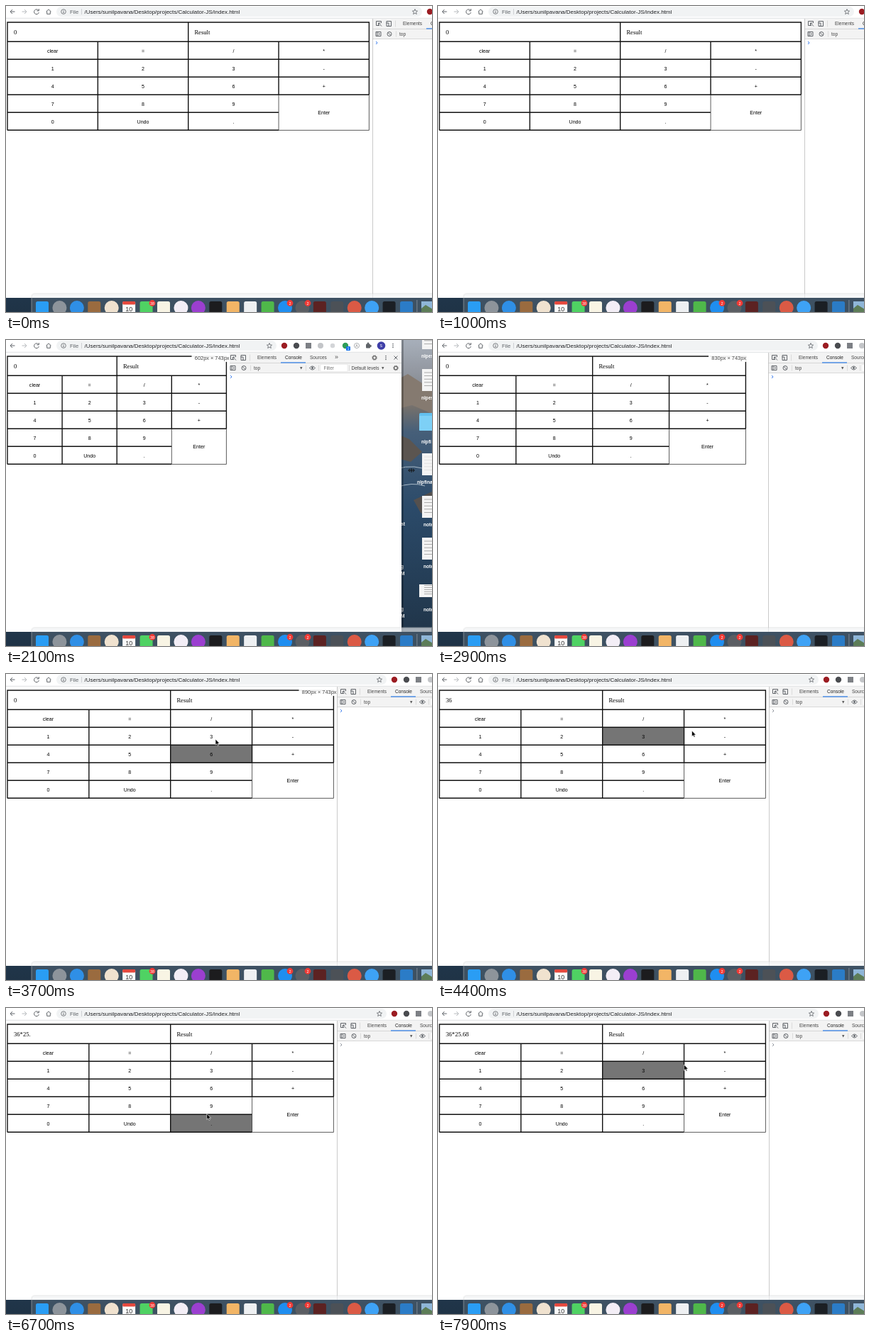
Recreate the animation shown at these times as an HTML page. Size 600 px wide and 432 px high, loop 8000 ms.

```html
<!DOCTYPE html>
<html lang="en">
<head>
<meta charset="utf-8">
<title>Calculator</title>
<style>
  html, body { margin: 0; width: 100%; height: 100%; overflow: hidden; background: #fff; }
  svg { display: block; width: 600px; height: 432px; font-family: "Liberation Sans", Arial, sans-serif; }
  .display { font-family: "Liberation Serif", Times, serif; font-size: 8.6px; }
  .key { font-size: 7.1px; text-anchor: middle; }
  .tab { font-size: 6.5px; fill: #444; }
  .file { font-size: 6.6px; font-weight: bold; fill: #fff; }
  .icon { fill: none; stroke: #5f6368; stroke-width: 1; }
</style>
</head>
<body>
<svg id="stage" viewBox="0 0 600 432">
  <defs>
    <linearGradient id="coast" x2="0" y2="1">
      <stop offset="0" stop-color="#a7afba"/>
      <stop offset=".14" stop-color="#8b8f97"/>
      <stop offset=".22" stop-color="#74706c"/>
      <stop offset=".3" stop-color="#465f79"/>
      <stop offset=".55" stop-color="#2b4a69"/>
      <stop offset="1" stop-color="#1f3346"/>
    </linearGradient>
    <clipPath id="pageClip"><rect id="clipRect" y="18" height="394"/></clipPath>
  </defs>
</svg>
<script>
const LOOP = 8000, STEP = 100;
const PANEL = 246;        // width of the developer panel
const PX = 0.5235;        // stage pixels per page pixel
const stage = document.getElementById('stage');
const clipRect = document.getElementById('clipRect');

function set(node, attrs) {
  for (const k in attrs) node.setAttribute(k, attrs[k]);
  return node;
}
function el(parent, tag, attrs, text) {
  const node = set(document.createElementNS('http://www.w3.org/2000/svg', tag), attrs || {});
  if (text !== undefined) node.textContent = text;
  parent.appendChild(node);
  return node;
}
const rect = (p, x, y, width, height, fill, extra) =>
  el(p, 'rect', { x, y, width, height, fill, ...extra });
const dot = (p, cx, cy, r, fill, extra) => el(p, 'circle', { cx, cy, r, fill, ...extra });
const path = (p, d, extra) => el(p, 'path', { d, class: 'icon', ...extra });
const text = (p, x, y, s, extra) => el(p, 'text', { x, y, ...extra }, s);

function gear(p, x, y) {
  dot(p, x, y, 2.3, 'none', { stroke: '#666', 'stroke-width': 1.3 });
  dot(p, x, y, 3.3, 'none', { stroke: '#666', 'stroke-width': 1, 'stroke-dasharray': '1.3 1.29' });
}
function kebab(p, x, y) {
  [-2.4, 0, 2.4].forEach(d => dot(p, x, y + d, 0.8, '#5f6368'));
}

// Desktop
const desktop = el(stage, 'g');
rect(desktop, 0, 0, 600, 432, 'url(#coast)');
path(desktop, 'M540 62L566 48L600 70V104L572 92L540 100Z', { style: 'fill:#857a70;stroke:none' });
path(desktop, 'M540 128L568 140L586 158L570 172L540 164Z', { style: 'fill:#5b5550;stroke:none' });
path(desktop, 'M574 226L600 214V250L584 244Z', { style: 'fill:#54504e;stroke:none' });
path(desktop, 'M550 182Q575 174 600 186M550 208Q572 200 590 206', { style: 'stroke:#a9bac8' });
[[-18, 'nlpes'], [41, 'nlpes'], [103, 'nlpfi'], [160, 'nlpfinal'], [220, 'note'], [279, 'note'], [340, 'note']]
  .forEach(([y, name], i) => {
    if (i === 2) {
      rect(desktop, 582, y, 24, 25, '#62c0ef', { rx: 2 });
      rect(desktop, 582, y + 4, 24, 21, '#7dd0f6', { rx: 1 });
    } else {
      const tall = i < 6;
      rect(desktop, tall ? 586 : 582, tall ? y : 345, 24, tall ? 31 : 18, '#f4f4f4');
      for (let k = 1; k < 6; k++)
        rect(desktop, 589, (tall ? y : 343) + k * (tall ? 4.6 : 3), 11, 0.8, i === 3 ? '#ddd' : '#9a9a9a');
    }
    text(desktop, i === 3 ? 579 : i > 3 ? 588 : 585, y + 43, name, { class: 'file' });
  });
[[262, 'at'], [322, 'g'], [332, 'M'], [382, 'g'], [392, 'M']]
  .forEach(([y, s]) => text(desktop, 556, y, s, { class: 'file' }));

// Browser window
const shadow = rect(stage, 0, 0, 3, 412, '#000', { opacity: 0.25 });
const frame = rect(stage, 0, 0, 600, 412, '#fff');

// Developer panel, x measured from the window's right edge
const panel = el(stage, 'g');
rect(panel, -PANEL, 18, PANEL, 28.5, '#f3f3f3');
[32, 46].forEach(y => rect(panel, -PANEL, y, PANEL, 0.7, '#cbcbcb'));
rect(panel, -PANEL, 18, 0.8, 394, '#bdbdbd');
path(panel, 'M-236 27.5H-240.5V21.5H-233.5V24M-237.5 24L-233 28.5M-237.5 27V24H-234.5');
path(panel, 'M-226 28.5V21.5H-219.5V28.5ZM-226.5 24H-223V29');
rect(panel, -214, 20.5, 0.6, 9, '#ccc');
[[-203, 'Elements'], [-164, 'Console'], [-129, 'Sources']].forEach(([x, s]) =>
  text(panel, x, 27.2, s, { class: 'tab', style: s === 'Console' ? 'fill:#222' : '' }));
rect(panel, -170, 31.4, 35, 1.1, '#1a73e8');
text(panel, -94, 27.4, '»', { style: 'font-size:9px;fill:#555' });
gear(panel, -38, 25);
kebab(panel, -22, 25);
path(panel, 'M-10.5 22.5L-5.5 27.5M-5.5 22.5L-10.5 27.5');
path(panel, 'M-241 36.5H-234V42.5H-241ZM-239 36.5V42.5M-237.5 38L-235.5 39.5L-237.5 41');
dot(panel, -222, 39.5, 3, 'none', { stroke: '#5f6368' });
path(panel, 'M-224 37.5L-220 41.5');
[-213, -135, -117, -74].forEach(x => rect(panel, x, 35.5, 0.6, 8, '#ccc'));
text(panel, -208, 41.8, 'top', { class: 'tab' });
text(panel, -143, 41.4, '▼', { style: 'font:4.5px "DejaVu Sans",sans-serif;fill:#555' });
path(panel, 'M-129.5 39.5Q-125.5 34.5 -121.5 39.5Q-125.5 44.5 -129.5 39.5Z');
dot(panel, -125.5, 39.5, 1.4, '#5f6368');
rect(panel, -114, 34.5, 38, 10, '#fff', { stroke: '#ddd', 'stroke-width': 0.5 });
text(panel, -109.5, 41.8, 'Filter', { class: 'tab', style: 'fill:#777' });
text(panel, -70.5, 41.8, 'Default levels', { class: 'tab' });
text(panel, -28, 41.4, '▼', { style: 'font:4.5px "DejaVu Sans",sans-serif;fill:#555' });
gear(panel, -8, 39.5);
const prompt = path(panel, 'M-241 50L-239 52L-241 54');

// Page with the calculator
const page = el(stage, 'g', { 'clip-path': 'url(#pageClip)' });
const sheet = rect(page, 0, 18, 600, 394, '#fff');
const ROWS = [
  ['clear', '=', '/', '*'], ['1', '2', '3', '-'], ['4', '5', '6', '+'],
  ['7', '8', '9', 'Enter'], ['0', 'Undo', '.']
];
const keys = [];
ROWS.forEach((row, r) => row.forEach((label, c) => {
  const tall = label === 'Enter', y = 50 + 25 * r, h = tall ? 50 : 25;
  keys.push({ label, c, y, h, box: rect(page, 0, y + 0.5, 1, h, '#fff') });
}));
keys.forEach(k => { k.label = text(page, 0, k.y + k.h / 2 + 3, k.label, { class: 'key' }); });
const grid = path(page, '', { style: 'stroke:#111;stroke-width:1.4' });
const enterEdge = path(page, '', { style: 'stroke:#333;stroke-width:.8' });
const entry = text(page, 11, 39.5, '0', { class: 'display' });
const result = text(page, 0, 39.5, 'Result', { class: 'display' });
const sizeTip = el(page, 'g');
rect(sizeTip, -53.5, 18, 53.5, 13, '#fff', { opacity: 0.92 });
const sizeText = text(sizeTip, -0.5, 27.6, '', { style: 'font-size:7.4px;fill:#444;text-anchor:end' });

// Toolbar
const bar = rect(stage, 0, 0, 600, 17, '#fff');
const barLine = rect(stage, 0, 16.8, 600, 0.8, '#d5d7da');
const pill = rect(stage, 71, 1, 500, 14, '#f1f3f4', { rx: 7 });
path(stage, 'M12.5 8H6M9 5L6 8L9 11');
path(stage, 'M22.5 8H29M26 5L29 8L26 11', { style: 'stroke:#b5b8bc' });
path(stage, 'M45.6 6A3.4 3.4 0 1 0 46.3 9M46.3 4V6.8H43.5');
path(stage, 'M56.5 8L60 4.8L63.5 8M57.7 7.5V11.3H62.3V7.5');
dot(stage, 81, 8, 3.3, 'none', { stroke: '#5f6368', 'stroke-width': 0.8 });
path(stage, 'M81 7.5V10M81 6V6.7');
text(stage, 90, 10.6, 'File', { style: 'font-size:7.6px;fill:#5f6368' });
rect(stage, 106, 4, 0.6, 8, '#b8bbbf');
text(stage, 110.5, 10.7, '/Users/sunilpavana/Desktop/projects/Calculator-JS/index.html',
  { style: 'font-size:8px;fill:#202124' });

const tools = el(stage, 'g');
path(tools, 'M-186 4.4L-185 6.9L-182.4 7.1L-184.4 8.8L-183.7 11.5L-186 10L-188.3 11.5L-187.6 8.8L-189.6 7.1L-187 6.9Z',
  { style: 'stroke-width:.8' });
dot(tools, -165, 8, 4.2, '#9b1c22');
dot(tools, -148, 8, 4.2, '#4a4c50');
rect(tools, -135, 4, 8, 8, '#7d8085');
dot(tools, -114, 8, 4, '#c3c5c8');
dot(tools, -97, 8, 3.2, '#d3d5d8');
dot(tools, -79, 8, 4.2, '#2f9d58');
rect(tools, -78, 9, 6, 6, '#1a73e8', { rx: 1 });
text(tools, -76.3, 13.8, '1', { style: 'font-size:4.6px;fill:#fff' });
dot(tools, -63, 8, 3.6, 'none', { stroke: '#9a9da1', 'stroke-width': 0.8 });
text(tools, -64.7, 10, 'A', { style: 'font-size:5px;fill:#777' });
rect(tools, -50, 5.5, 6, 6, '#5f6368', { rx: 1 });
dot(tools, -47, 5, 1.4, '#5f6368');
dot(tools, -43.6, 8.5, 1.4, '#5f6368');
dot(tools, -28.5, 8, 5.8, '#3f3fa8');
text(tools, -30.2, 10.2, 's', { style: 'font-size:6.5px;fill:#fff' });
kebab(tools, -12, 8);

// Dock
const dock = el(stage, 'g');
rect(dock, 36, 406, 580, 40, '#aab4be', { 'fill-opacity': 0.22, stroke: '#ccc', 'stroke-width': 0.5, rx: 4 });
rect(dock, 36.5, 406.5, 563, 5.5, '#fff', { opacity: 0.55 });
const APPS = ('#2a9df4 o#8d949b o#2f8fe6 #9a6b3f o#f0e2cf #fafafa #4fd263 #f8f4e4 o#f3eef6 o#9b3fd0 #1c1c1e ' +
  '#f2b566 #eef0f2 #4fb84a o#1f8ef0 o#5b5e63 #5c2222 #4c5157 o#db5a45 o#3ea2f5 #1b1f24 #2b7cc7').split(' ');
APPS.forEach((app, i) => {
  const x = 51 + 24.43 * i;
  if (app[0] === 'o') dot(dock, x, 426, 10, app.slice(1));
  else rect(dock, x - 9, 417, 18, 20, app, { rx: 2.5 });
  if (i === 5) {
    rect(dock, x - 9, 417, 18, 4.5, '#e5483d', { rx: 1.5 });
    text(dock, x, 430.5, '10', { style: 'font-size:9px;fill:#333;text-anchor:middle' });
  }
});
[[206, '38'], [400, '2'], [425, '2']].forEach(([x, n]) => {
  dot(dock, x, 419.5, 4.4, '#f03a35');
  text(dock, x, 421.6, n, { style: 'font-size:5.5px;fill:#fff;text-anchor:middle' });
});
rect(dock, 578.5, 415, 0.8, 17, '#8c98a4');
rect(dock, 585, 417, 16, 16, '#8fb6d8');
path(dock, 'M585 427L591 422L601 428V433H585Z', { style: 'fill:#5d7d58;stroke:none' });

// Pointers
const resizer = path(stage, 'M-4 0H4M-2 -2.2L-4.3 0L-2 2.2M2 -2.2L4.3 0L2 2.2M0 -3V3',
  { style: 'stroke:#111;stroke-width:1' });
const arrow = path(stage, 'M0 0V8.2L1.9 6.5L3.2 9.3L4.6 8.6L3.3 6H5.8Z',
  { style: 'fill:#000;stroke:#fff;stroke-width:.6' });

// Motion: window edge and pointer as [time, value...]
const EDGE = [[1000, 762], [1100, 752], [1400, 632], [1500, 624], [1700, 580], [1970, 561], [2000, 561],
  [2100, 557], [2300, 555], [2770, 680.5], [2800, 684], [2900, 711], [3000, 712]];
const POINTER = [[3200, 700, 184], [3700, 295, 92], [3900, 290, 88], [4050, 292, 112], [4200, 293, 113],
  [4400, 357.5, 80], [4700, 400, 64], [5000, 400, 64], [5600, 191, 95.5], [5800, 188, 92],
  [6000, 184, 113], [6200, 186, 114], [6450, 280, 160], [6650, 282, 161], [6850, 285, 114],
  [7050, 285, 114], [7350, 185, 138], [7550, 185, 138], [7900, 346.5, 80]];
const TYPED = [[0, '0'], [3800, '3'], [4200, '36'], [4900, '36*'], [5700, '36*2'], [6100, '36*25'],
  [6600, '36*25.'], [7000, '36*25.6'], [7500, '36*25.68']];

function track(list, t, i = 1) {
  if (t <= list[0][0]) return list[0][i];
  const n = list.findIndex(k => k[0] >= t);
  if (n < 0) return list[list.length - 1][i];
  const a = list[n - 1], b = list[n];
  return a[i] + (b[i] - a[i]) * (t - a[0]) / (b[0] - a[0]);
}

function layoutPage(width, t) {
  const left = 2, right = width - 4.6, col = (right - left) / 4;
  const x = n => left + col * n;
  const hx = track(POINTER, t - 50), hy = track(POINTER, t - 50, 2);
  const hovering = t >= 3300;
  set(clipRect, { width });
  set(sheet, { width });
  keys.forEach(k => {
    const over = hovering && hx >= x(k.c) && hx < x(k.c + 1) && hy >= k.y && hy < k.y + k.h;
    set(k.box, { x: x(k.c), width: col, fill: over ? '#757575' : '#fff' });
    set(k.label, { x: x(k.c + 0.5) });
  });
  let d = `M${left} 23H${right}V125.3M${left} 22.3V175.5M${x(2)} 23V50M${left} 175.2H${x(3)}`;
  for (let y = 50.3; y < 130; y += 25) d += `M${left} ${y}H${right}`;
  d += `M${left} 150.3H${x(3)}`;
  [1, 2].forEach(n => { d += `M${x(n)} 50V175.5`; });
  set(grid, { d: d + `M${x(3)} 50V125.5` });
  set(enterEdge, { d: `M${x(3)} 125V175.4H${right}V125` });
  set(result, { x: x(2) + 8.7 });
}

function draw(t) {
  const edge = track(EDGE, t), pageWidth = track(EDGE, t - 100) - PANEL;
  const move = { transform: `translate(${edge} 0)` };
  set(frame, { width: edge });
  set(shadow, { x: edge });
  set(bar, { width: edge });
  set(barLine, { width: edge });
  set(pill, { width: edge - 247 });
  set(panel, move);
  set(tools, move);
  layoutPage(pageWidth, t);

  const tipWidth = track(EDGE, t - 130) - PANEL;
  set(sizeTip, { transform: `translate(${tipWidth} 0)`, visibility: t >= 1100 && t < 3900 ? 'visible' : 'hidden' });
  sizeText.textContent = `${Math.round(tipWidth / PX)}px × 743px`;

  entry.textContent = TYPED.filter(k => k[0] <= t).pop()[1];
  set(prompt, { style: `stroke:${t < 3800 ? '#3b7ded' : '#8a8f98'}` });
  set(resizer, { transform: `translate(${edge + 14} 184)`, visibility: t < 3000 ? 'visible' : 'hidden' });
  set(arrow, {
    transform: `translate(${track(POINTER, t)} ${track(POINTER, t, 2)})`,
    visibility: t >= 3200 ? 'visible' : 'hidden'
  });
}

const start = performance.now();
function tick() {
  const t = (performance.now() - start) % LOOP;
  draw(Math.floor(t / STEP) * STEP);
  requestAnimationFrame(tick);
}
tick();
</script>
</body>
</html>
```
